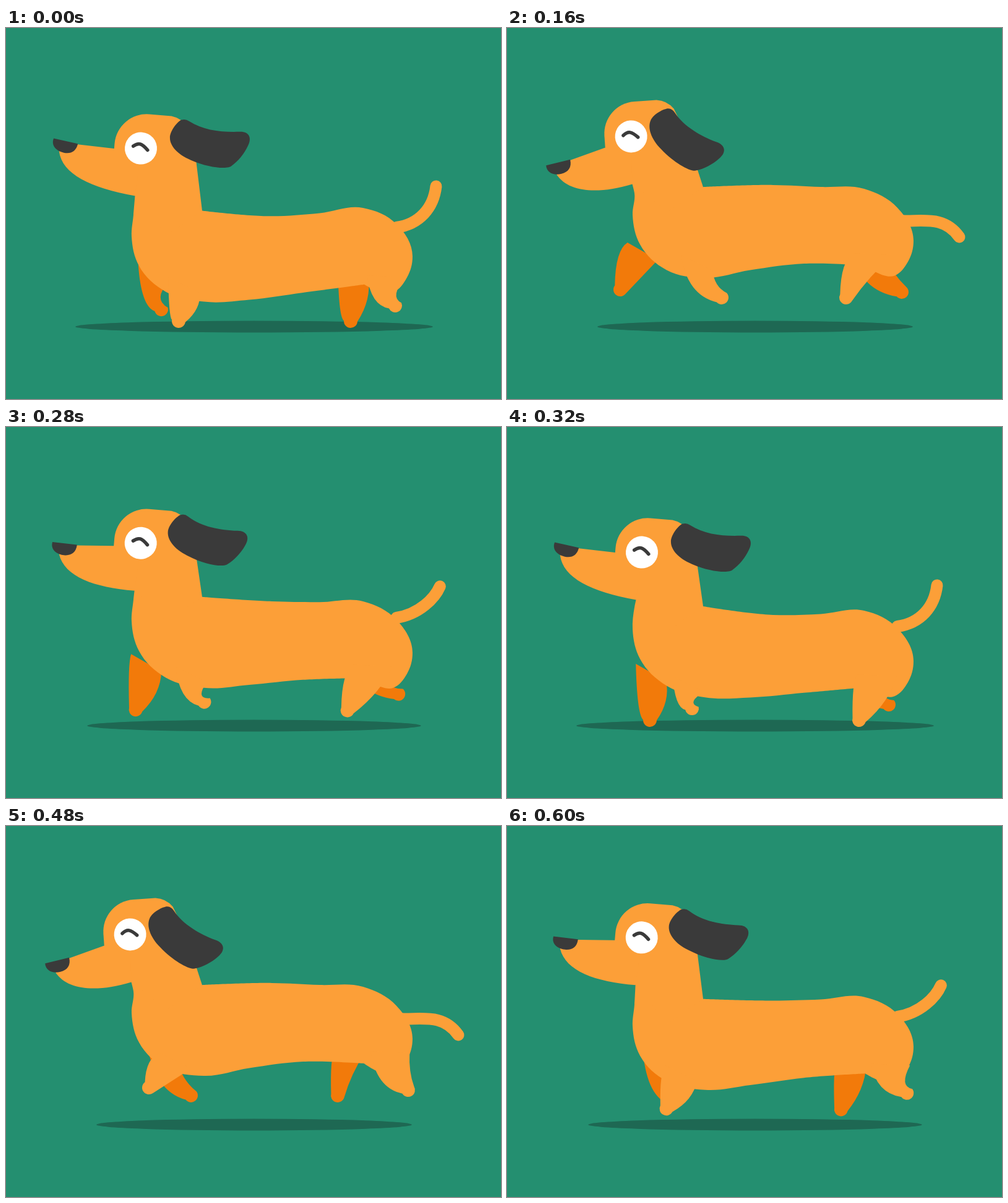
An HTML page with a canvas that plays this animation: 800x600 px, repeating every 640 ms.

```html
<!DOCTYPE html>
<html lang="en">
<head>
<meta charset="utf-8">
<title>Running dachshund</title>
<style>
html, body { margin: 0; width: 100%; height: 100%; overflow: hidden; background: #248f70; }
canvas { display: block; }
</style>
</head>
<body>
<canvas id="stage" width="800" height="600"></canvas>
<script>
const ctx = document.getElementById('stage').getContext('2d');
const LOOP = 640, STEP = 40;
const ORANGE = '#fc9f38', RUST = '#f27a0a', DARK = '#3a3a3a';
const { cos, sin, atan2, hypot, exp, PI } = Math;

// Resting outline: along the back, over the rump, under the belly, up the chest
const OUTLINE = [
  [317, 275], [430, 279], [507, 279], [577, 277], [631, 306], [657, 359], [648, 393], [626, 416],
  [579, 401], [480, 405], [393, 415], [320, 422], [258, 407], [215, 365], [203, 317], [206, 282]
];
const CORNERS = [0, 8, 16];

// Cosine and sine weights over one stride; the far leg runs half a stride later
const FRONT = {
  foot: [289, -10, 58], drop: [458, 9.4, 6.4], bob: [17.5, 12], bend: [-20, 6],
  near: { hip: 290, hipY: 385, shift: 0, back: 26, slope: 25 },
  far: { hip: 236, hipY: 365, shift: -48, back: 24, slope: 28 }
};
const REAR = {
  foot: [599, 30, -51], drop: [457.5, -12.5, 4.5], bob: [15, 17], bend: [20, 0],
  near: { hip: 600, hipY: 382, shift: 0, back: 38, slope: 3 },
  far: { hip: 570, hipY: 382, shift: -12, back: 24, slope: 3 }
};

function fill(color, trace) {
  ctx.beginPath();
  trace();
  ctx.fillStyle = color;
  ctx.fill();
}

function line(color, width, start, curve) {
  ctx.beginPath();
  ctx.moveTo(...start);
  ctx.bezierCurveTo(...curve);
  ctx.strokeStyle = color;
  ctx.lineWidth = width;
  ctx.lineCap = 'round';
  ctx.stroke();
}

function within(x, y, degrees, paint) {
  ctx.save();
  ctx.translate(x, y);
  ctx.rotate(degrees * PI / 180);
  paint();
  ctx.restore();
}

// Closed smooth curve through the points, sharp at the corners
function smooth(points, corners) {
  const n = points.length, pt = i => points[(i + n) % n];
  const handle = (i, length) => {
    if (corners.includes(i % n)) return [0, 0];
    const a = pt(i - 1), p = pt(i), b = pt(i + 1);
    const la = hypot(p[0] - a[0], p[1] - a[1]) ** 2, lb = hypot(b[0] - p[0], b[1] - p[1]) ** 2;
    const d = p.map((v, k) => (v - a[k]) / la + (b[k] - v) / lb);
    return d.map(v => v * length / hypot(...d));
  };
  ctx.moveTo(...pt(0));
  for (let i = 0; i < n; i++) {
    const p = pt(i), q = pt(i + 1), len = hypot(q[0] - p[0], q[1] - p[1]) * 0.35;
    const a = handle(i, len), b = handle(i + 1, len);
    ctx.bezierCurveTo(p[0] + a[0], p[1] + a[1], q[0] - b[0], q[1] - b[1], ...q);
  }
}

function drawLeg(pair, side, color, wave, stride) {
  const { hip, hipY, shift, back, slope } = pair[side];
  const turn = side === 'near' ? 1 : -1, radius = 11;
  const swing = turn * stride(pair.foot[1], pair.foot[2]);
  const x = pair.foot[0] + shift + swing;
  const y = wave(pair.drop[0], ...pair.bob) + turn * stride(pair.drop[1], pair.drop[2]) - radius;
  const bend = 6 + turn * stride(...pair.bend);
  const mid = hip + 0.28 * swing, top = wave(hipY, 18, 19, -3);
  const a = [mid - 25, top], g = [mid + back, top + slope];

  const angle = atan2(y - top - slope, x - mid);
  const left = [-sin(angle), cos(angle)];
  const l = [x + left[0] * radius, y + left[1] * radius];
  const r = [x - left[0] * radius, y - left[1] * radius];
  // The front edge rounds a knee: ahead of the hip or below it
  const knee = l[0] < a[0] ? [l[0] - 4, a[1]] : [a[0], y + radius];
  const front = knee.map((v, k) => 0.65 * v + 0.175 * (a[k] + l[k]));
  const rear = left.map((v, k) => (g[k] + r[k]) / 2 + v * bend);
  fill(color, () => {
    ctx.moveTo(...a);
    ctx.quadraticCurveTo(...front, ...l);
    ctx.arc(x, y, radius, angle + PI / 2, angle - PI / 2, true);
    ctx.quadraticCurveTo(...rear, ...g);
  });
}

function drawHead(x, y, wave, nape, jaw) {
  const tilt = wave(0.4, 4.4, -2);
  // Skull and neck
  fill(ORANGE, () => {
    within(x, y, tilt, () => {
      ctx.moveTo(-43, 20);
      ctx.arc(9, -4, 52, PI, PI * 1.5);
      ctx.lineTo(45, -56);
      ctx.quadraticCurveTo(62, -54, 72, -40);
      ctx.lineTo(88, 0);
    });
    ctx.lineTo(...nape);
    ctx.lineTo(260, nape[1] + 40);
    ctx.lineTo(...jaw);
  });

  // Muzzle and nose nod about a point below the eye
  const nod = wave(-3.6, 13.2, -2.7, 4);
  fill(ORANGE, () => {
    ctx.moveTo(x, y + 10);
    ctx.lineTo(...jaw);
    within(x - 5, y + 8, nod, () => {
      ctx.bezierCurveTo(-66, 68, -115, 54, -126, 18);
      ctx.lineTo(-98, 2);
      ctx.lineTo(-39, -1);
    });
  });
  within(x - 5, y + 8, nod, () => within(-138, -1, 3, () => fill(DARK, () => {
    ctx.moveTo(0, 0);
    ctx.lineTo(40, 0);
    ctx.bezierCurveTo(40, 13, 32, 19, 21, 19);
    ctx.bezierCurveTo(8, 19, -2, 12, 0, 0);
  })));

  within(x, y, tilt, () => {
    fill('#fff', () => ctx.arc(0, 0, 26, 0, 7));
    line(DARK, 5.5, [-12.5, -2.5], [-4, -9.5, 1, -8, 11, 2]);
  });

  // Ear
  within(x + 61, y - 59, wave(11.7, -11.6, -1), () => fill(DARK, () => {
    ctx.moveTo(17, 15);
    ctx.bezierCurveTo(40, 30, 70, 33, 98, 32);
    ctx.bezierCurveTo(114, 31, 119, 42, 112, 55);
    ctx.bezierCurveTo(106, 68, 96, 80, 86, 87);
    ctx.bezierCurveTo(80, 93, 50, 91, 20, 78);
    ctx.bezierCurveTo(-2, 69, -14, 55, -14, 42);
    ctx.bezierCurveTo(-14, 30, 0, 14, 5, 13);
    ctx.quadraticCurveTo(11, 11, 17, 15);
  }));
}

function draw(t) {
  const step = t / LOOP * 2 * PI, beat = step * 2;
  // Two bounces per loop, one stride per loop
  const wave = (mean, c, s, skew = 0) => mean + c * cos(beat) + s * sin(beat) + skew * sin(2 * beat);
  const stride = (c, s) => c * cos(step) + s * sin(step);

  ctx.fillStyle = '#248f70';
  ctx.fillRect(0, 0, 800, 600);
  fill('#1e6853', () => ctx.ellipse(401, 483, wave(272, 17, 30, -7), 9.5, 0, 0, 7));

  // The middle of the body flexes most, and the whole body rocks slightly
  const bob = wave(0, 18, 19, -3);
  const body = OUTLINE.map(([x, y]) => {
    const flex = 0.82 + 0.58 * exp(-(((x - 440) / 110) ** 2));
    return [x, y + bob * flex + stride(0.022, 0) * (440 - x)];
  });
  const eyeX = wave(209.3, 8.7, -3.2);
  const eyeY = wave(187, 11.6, 21.5, -4) + stride(-4, 0);
  const jaw = [wave(205.5, 3, 0), eyeY + 77];

  for (const pair of [FRONT, REAR]) drawLeg(pair, 'far', RUST, wave, stride);
  const root = wave(317, 5.5, 17.5);
  line(ORANGE, 19, [631, root], [
    668, root + wave(-1, -4, 2.5),
    wave(698, -7, 0), wave(296, -5, 22),
    wave(713, -18, -1.5), wave(297, -41, 14.5)
  ]);
  fill(ORANGE, () => smooth([...body, jaw], CORNERS));
  for (const pair of [FRONT, REAR]) drawLeg(pair, 'near', ORANGE, wave, stride);
  drawHead(eyeX, eyeY, wave, body[0], jaw);
}

const start = performance.now();
function tick() {
  const t = (performance.now() - start) % LOOP;
  draw(Math.floor(t / STEP) * STEP);
  requestAnimationFrame(tick);
}
tick();
</script>
</body>
</html>
```
